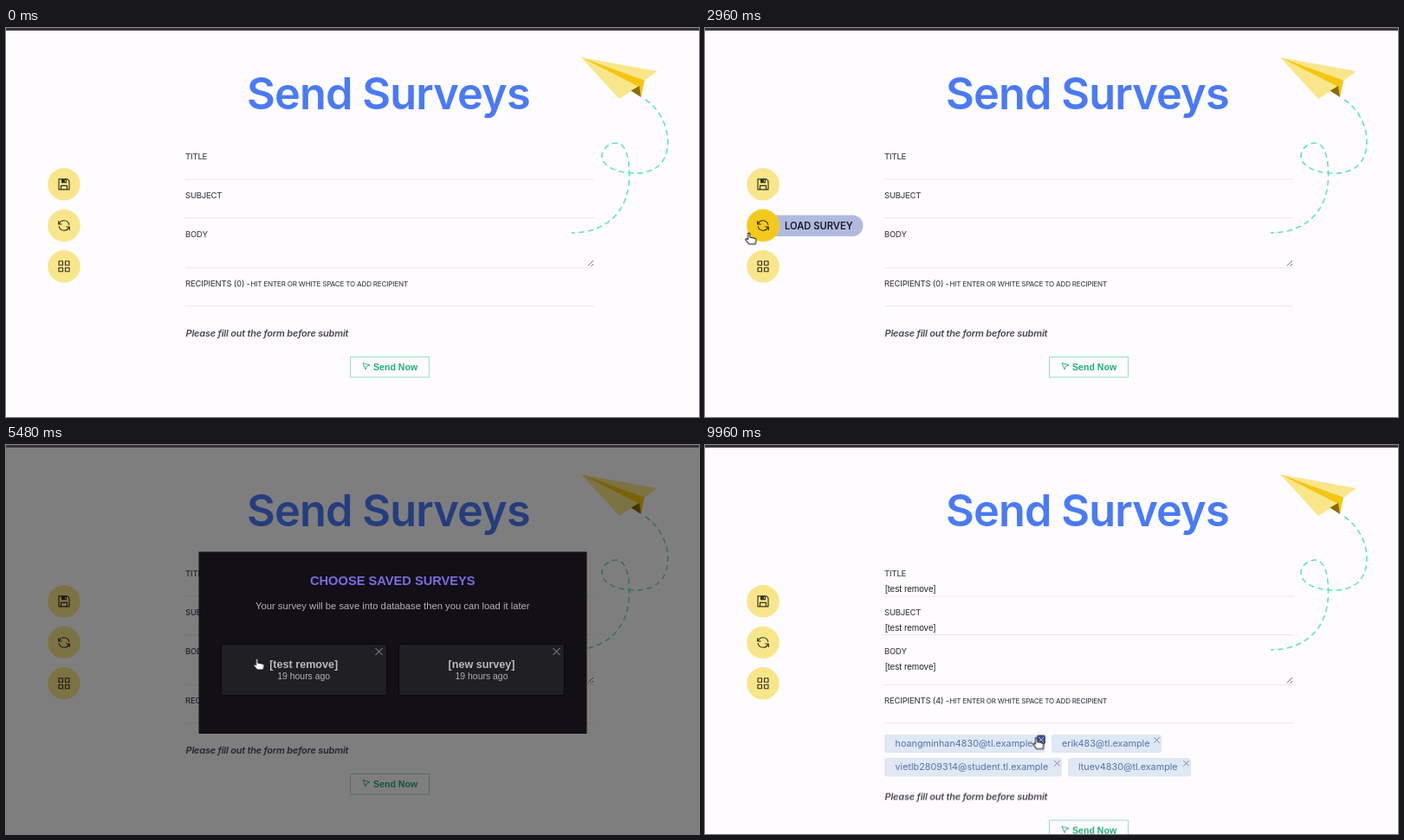
An HTML page for the animation above (10 s loop, 800 by 450 pixels).

```html
<!DOCTYPE html>
<html lang="en">
<head>
<meta charset="utf-8">
<title>Send Surveys</title>
<style>
html, body { margin: 0; width: 100%; height: 100%; overflow: hidden; background: #fefcff; }
svg { display: block; }
text { white-space: pre; }
.ui { font-family: Inter, sans-serif; font-weight: 500; fill: #4b4757; }
.sans { font-family: "Liberation Sans", Arial, sans-serif; }
.mid { text-anchor: middle; }
.title { font-size: 50.5px; font-weight: 600; letter-spacing: -.9px; fill: #4a7afa; }
.label { font-size: 9.5px; letter-spacing: -.2px; }
.hint { font-size: 8.1px; }
.note { font-size: 11px; font-style: italic; font-weight: 600; letter-spacing: -.22px; }
.tip { font-size: 11.2px; font-weight: 600; fill: #1d1b24; }
.value { font-size: 10.1px; fill: #222; }
.rule { stroke: #e9e6ed; }
.icon { fill: none; stroke: #35301f; stroke-width: 1.15; stroke-linejoin: round; stroke-linecap: round; }
.disc { fill: #f9e68b; }
.chips rect { fill: #dfe8f3; }
.chips text { font: 400 10.8px Inter, sans-serif; fill: #5673ad; }
.card { fill: #201f23; stroke: #08070a; }
.name { font-size: 12.6px; font-weight: bold; fill: #bbb9be; }
.age { font-size: 10.45px; fill: #b2b0b5; }

.anim, .step { animation: 10s linear infinite; }
.step { animation-timing-function: step-end; }
.hover { animation-name: hover; }
.pill { animation-name: pill; animation-timing-function: ease; }
.modal { animation-name: modal; }
.pick { animation-name: pick; }
.cursor { animation-name: cursor; animation-timing-function: ease-in-out; }
.empty { animation-name: empty; }
.filled { animation-name: filled; }
.lower { animation-name: lower; }
.remove { animation-name: remove; }
.arrow { animation-name: arrow; }
.beam { animation-name: beam; }
.hand { animation-name: hand; }

@keyframes hover { 0%, 24% { opacity: 0 } 26%, 47% { opacity: 1 } 49.5%, 100% { opacity: 0 } }
@keyframes pill {
  0%, 24.4% { transform: translateX(-118px) }
  27.4%, 43.4% { transform: none }
  46%, 100% { transform: translateX(-118px) }
}
@keyframes modal { 0%, 45.2% { opacity: 0 } 48.5%, 75% { opacity: 1 } 78%, 100% { opacity: 0 } }
@keyframes pick { 0%, 55% { opacity: 0 } 58%, 78% { opacity: 1 } 79%, 100% { opacity: 0 } }
@keyframes empty { 0% { opacity: 1 } 75%, 100% { opacity: 0 } }
@keyframes filled { 0% { opacity: 0 } 75%, 100% { opacity: 1 } }
@keyframes lower { 0% { transform: none } 75%, 100% { transform: translateY(53.6px) } }
@keyframes remove { 0% { opacity: 0 } 97.4%, 100% { opacity: 1 } }
@keyframes cursor {
  0%, 6.4% { transform: translate(784px, 212px) }
  12.4%, 13.2% { transform: translate(414px, 163px) }
  20% { transform: translate(34px, 214px) }
  24% { transform: translate(42px, 232px) }
  29.2%, 32% { transform: translate(50.5px, 237px) }
  42%, 49.5% { transform: translate(58px, 231px) }
  54.6%, 56% { transform: translate(289.5px, 247px) }
  68%, 86% { transform: translate(366px, 261px) }
  98.5%, 100% { transform: translate(382.5px, 338.5px) }
}
@keyframes arrow {
  0% { opacity: 0 } 6.4% { opacity: 1 } 8.6% { opacity: 0 } 16.6% { opacity: 1 }
  24% { opacity: 0 } 45.3% { opacity: 1 } 53.6% { opacity: 0 } 75% { opacity: 1 }
  78% { opacity: 0 } 90.6% { opacity: 1 } 97.4%, 100% { opacity: 0 }
}
@keyframes beam {
  0% { opacity: 0 } 8.6% { opacity: 1 } 16.6% { opacity: 0 }
  78% { opacity: 1 } 90.6%, 100% { opacity: 0 }
}
@keyframes hand {
  0% { opacity: 0 } 24% { opacity: 1 } 45.3% { opacity: 0 } 53.6% { opacity: 1 }
  75% { opacity: 0 } 97.4%, 100% { opacity: 1 }
}
</style>
</head>
<body>
<svg width="800" height="450" viewBox="0 0 800 450">
  <defs>
    <clipPath id="slot"><rect x="67" y="210" width="130" height="40"/></clipPath>
    <path id="x" d="M-3.2-3.2 3.2 3.2M3.2-3.2-3.2 3.2" fill="none"/>
    <path id="bar" d="M-3-5.5H3M0-5.5V5.5M-3 5.5H3" fill="none"/>
  </defs>
  <rect width="800" height="450" fill="#fefcff"/>

  <!-- heading and paper plane -->
  <text class="ui title" x="278" y="94">Send Surveys</text>
  <path d="M738 83C752 92 764 110 764 132C764 155 750 168 727 168C705 168 688 160 688 148C688 139 697 133 704 133C716 133 720 152 719.5 172C719 215 690 237 653 237"
    fill="none" stroke="#5fe6bb" stroke-width="1.6" stroke-dasharray="6.5 4.3"/>
  <path d="M664 34 752 50 737 61ZM664 34 731 67.5 708 82Z" fill="#f9e68b"/>
  <path d="M664 34 737 60.5 733 80 730 67.5Z" fill="#f5c60e"/>
  <path d="M721.5 72.5 731 67 733 80Z" fill="#8c6b0a"/>

  <!-- side buttons -->
  <g clip-path="url(#slot)">
    <g class="anim pill">
      <rect x="50" y="216.5" width="132.5" height="24.5" rx="12.25" fill="#b0badf"/>
      <text class="ui tip" x="92" y="233">LOAD SURVEY</text>
    </g>
  </g>
  <g transform="translate(67 180.8)">
    <circle class="disc" r="18.8"/>
    <path class="icon" d="M-6-6H4L6-4V6H-6ZM-3.5 6V1.5H3.5V6"/>
    <path d="M-3-6H3V-1.5H-3ZM1-5V-2.8H2V-5Z" fill="#35301f" fill-rule="evenodd"/>
  </g>
  <g transform="translate(67 228.5)">
    <circle class="disc" r="18.8"/>
    <circle class="anim hover" r="18.8" fill="#f3c91c"/>
    <path class="icon" d="M-5.8-1.5A6 6 0 0 1 5.8-1M5.8 1.5A6 6 0 0 1-5.8 1M-6.3-5V-1.5H-2.8M6.3 5V1.5H2.8"/>
  </g>
  <g transform="translate(67 275.8)">
    <circle class="disc" r="18.8"/>
    <path class="icon" d="M-6-6h4.5v4.5H-6ZM1.5-6H6v4.5H1.5ZM-6 1.5h4.5V6H-6ZM1.5 1.5H6V6H1.5Z"/>
  </g>

  <!-- form -->
  <path class="rule" d="M207 175H679M207 219.5H679M207 277.3H679M207 321.8H679"/>
  <path d="M672 275 678 269M675.5 275.5 678 273" stroke="#77747c" fill="none"/>
  <g class="ui label">
    <text x="207" y="152">TITLE</text>
    <text x="207" y="197">SUBJECT</text>
    <text x="207" y="241.5">BODY</text>
    <text class="step empty" x="207" y="299">RECIPIENTS (0) -</text>
    <text class="step filled" x="207" y="299">RECIPIENTS (4) -</text>
    <text class="hint" x="282.5" y="299">HIT ENTER OR WHITE SPACE TO ADD RECIPIENT</text>
  </g>
  <g class="step filled">
    <g class="sans value">
      <text x="208" y="170">[test remove]</text>
      <text x="208" y="215">[test remove]</text>
      <text x="208" y="259.7">[test remove]</text>
    </g>
    <g class="chips">
      <rect x="207" y="335" width="186" height="21" rx="3"/>
      <rect x="400" y="335" width="127" height="21" rx="3"/>
      <rect x="207" y="362" width="205" height="21.5" rx="3"/>
      <rect x="419" y="362" width="142" height="21.5" rx="3"/>
      <text x="219.5" y="349.3">hoangminhan4830@tl.example</text>
      <text x="412" y="349.3">erik483@tl.example</text>
      <text x="219.5" y="376">vietlb2809314@student.tl.example</text>
      <text x="431" y="376">ltuev4830@tl.example</text>
      <g stroke="#6f86b8">
        <use href="#x" x="388" y="341"/>
        <use href="#x" x="521.5" y="341.5"/>
        <use href="#x" x="406.5" y="368.3"/>
        <use href="#x" x="555.5" y="368.3"/>
      </g>
    </g>
    <g class="step remove">
      <rect x="383" y="335.5" width="10" height="10.5" rx="2" fill="#3d4f93"/>
      <use href="#x" x="388" y="341" stroke="#aab8de"/>
    </g>
  </g>
  <g class="step lower">
    <text class="ui note" x="207.5" y="357">Please fill out the form before submit</text>
    <rect x="397.5" y="380.5" width="91" height="23.5" fill="none" stroke="#98e0c7"/>
    <path d="M412 387.5 420 390 416.3 391.5 415 395Z" fill="none" stroke="#22b07a" stroke-width=".9"/>
    <text class="sans" x="424" y="396" font-size="10.6" font-weight="bold" fill="#1fae76">Send Now</text>
  </g>

  <!-- saved surveys dialog -->
  <g class="anim modal">
    <rect width="800" height="450" fill="#000" fill-opacity=".5"/>
    <rect x="222.5" y="123.5" width="448" height="210.5" fill="#100e14" fill-opacity=".975"/>
    <g class="sans mid">
      <text x="446.3" y="162" font-size="14.65" font-weight="bold" fill="#7c6ce0">CHOOSE SAVED SURVEYS</text>
      <text x="446.3" y="190.3" font-size="11.26" fill="#b5b3b8">Your survey will be save into database then you can load it later</text>
      <rect class="card" x="248.5" y="230.5" width="191" height="59" rx="1.5"/>
      <rect class="card" x="453.5" y="230.5" width="191" height="59" rx="1.5"/>
      <rect class="anim pick" x="248" y="230.3" width="192" height="60" rx="2" fill="#100e14" stroke="#4059bd" stroke-width="1.7"/>
      <text class="name" x="343.7" y="258">[test remove]</text>
      <text class="age" x="343.7" y="270.7">19 hours ago</text>
      <text class="name" x="549" y="258">[new survey]</text>
      <text class="age" x="549" y="270.7">19 hours ago</text>
    </g>
    <path d="M426.5 235l8 8m0-8-8 8M631.5 235l8 8m0-8-8 8" stroke="#9b99a0"/>
  </g>

  <rect width="800" height="3" fill="#38323a"/>

  <g class="anim cursor">
    <path class="step arrow" d="M0 0V12L2.8 9.5 4.8 14 7 13 5 8.7H8.6Z" fill="#111" stroke="#fff" stroke-width=".9"/>
    <g class="step beam">
      <use href="#bar" stroke="#222" stroke-width="2.8"/>
      <use href="#bar" stroke="#ddd" stroke-width=".7"/>
    </g>
    <path class="step hand" d="M-1 .6Q.3-.6 1.3.6V5L7 6.2Q8.7 6.6 8.4 8.3L7.7 13H.3L-3.6 8.2Q-3.8 6.6-2.4 6.7L-1 7.6Z"
      fill="#fff" stroke="#161616" stroke-width="1.1" stroke-linejoin="round"/>
  </g>
</svg>
</body>
</html>
```
